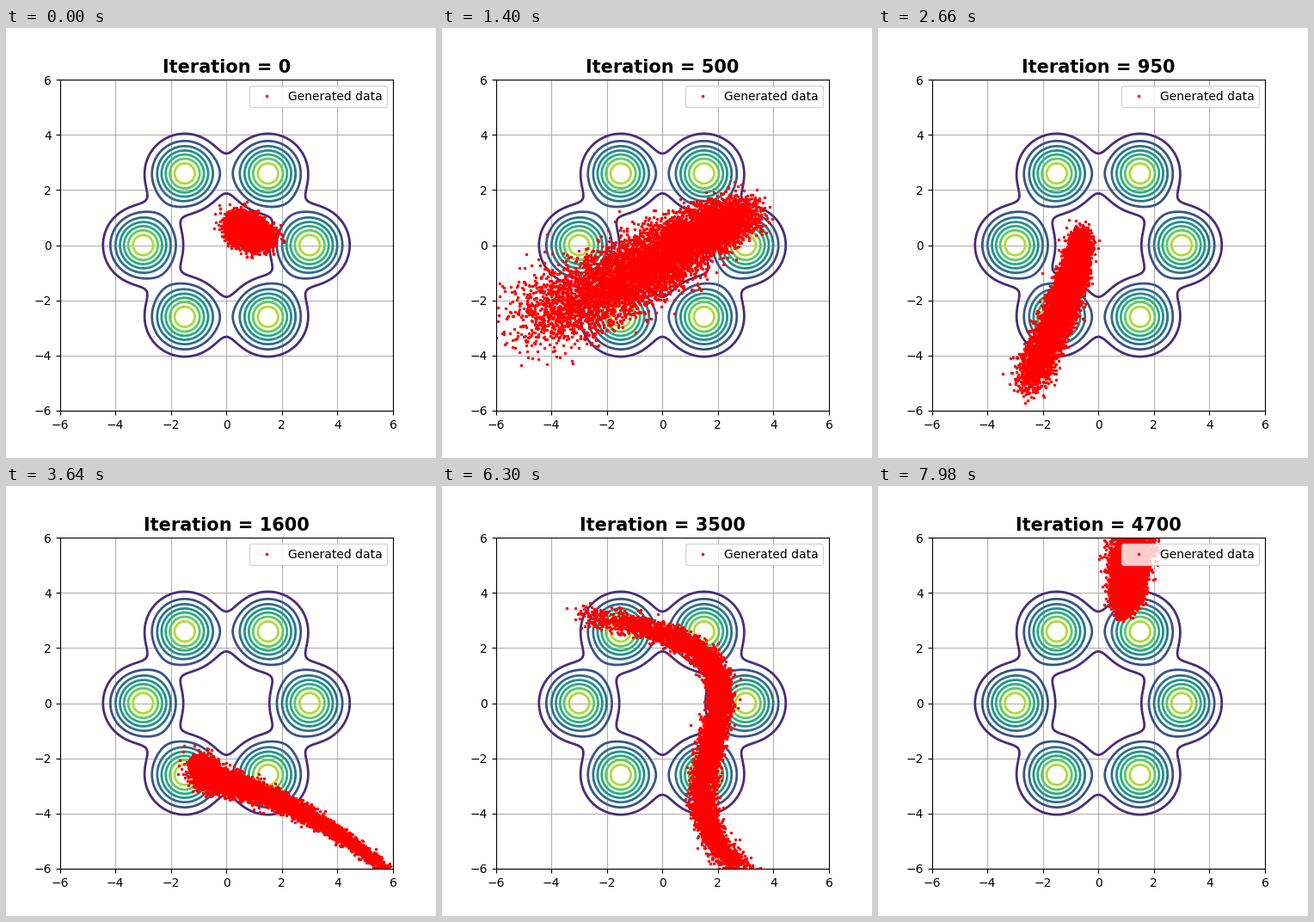
Recreate the animation shown at these times as a matplotlib script. Size 500 by 500 pixels, loop 8000 ms.

```python
import numpy as np
import matplotlib.pyplot as plt
from matplotlib.animation import FuncAnimation

TICK = 20        # ms per animation frame
HOLD = 7         # frames per training snapshot
FRAMES = 400
LIM = 6
N = 8000

# snapshot: (spread at head and tail, four points along the spine)
POSES = {
    0: ((.25, .24), [(.3, .8), (.6, .6), (.9, .4), (1.4, .25)]),
    10: ((.35, .75), [(3.3, 1.2), (1.1, .3), (-1.2, -1.1), (-5, -2.7)]),
    19: ((.2, .3), [(-.6, .5), (-.95, -1.1), (-1.55, -2.8), (-2.6, -5.1)]),
    26: ((.27, .1), [(-.9, -2.2), (-.2, -2.8), (2.2, -3.7), (5.8, -6.1)]),
    35: ((.4, .17), [(4.1, 1.4), (2.2, 1.35), (-1.2, .75), (-6.6, -.65)]),
    45: ((.22, .2), [(3.4, -6.4), (1.5, -2.6), (2, .9), (-3, 3.2)]),
    56: ((.22, .22), [(-2.2, -6.2), (-2.8, -3.5), (-1.9, -1.7), (-.3, .4)]),
    57: ((.18, .4), [(.9, 3.4), (1, 4.2), (1.15, 5.2), (1.35, 6.8)]),
}
STEPS = list(POSES)

rng = np.random.default_rng(4)
along = rng.beta(1.4, 1.4, N)
noise = rng.normal(size=(N, 2))


def cloud(step):
    """Noise scattered around a cubic spine, blended between two poses."""
    k = min(np.searchsorted(STEPS, step, side="right"), len(STEPS) - 1)
    a, b = STEPS[k - 1], STEPS[k]
    f = (step - a) / (b - a)
    (head, tail), spine = ((1 - f) * np.array(p) + f * np.array(q)
                           for p, q in zip(POSES[a], POSES[b]))
    cubic = np.polyfit(np.linspace(0, 1, 4), spine, 3)
    width = head + (tail - head) * along
    return np.vander(along, 4) @ cubic + noise * width[:, None]


def iteration(step):
    return 50 * step if step <= 20 else 1000 + 100 * (step - 20)


fig, ax = plt.subplots(figsize=(5, 5), dpi=100)
ax.set(xlim=(-LIM, LIM), ylim=(-LIM, LIM))
ax.grid(True)

# Six Gaussian modes on a circle of radius 3
axis = np.linspace(-LIM, LIM, 241)
X, Y = np.meshgrid(axis, axis)
density = sum(np.exp(-(X - 3 * np.cos(a)) ** 2 - (Y - 3 * np.sin(a)) ** 2)
              for a in np.arange(6) * np.pi / 3)
ax.contour(X, Y, density, levels=np.arange(1, 8) / 8, linewidths=2,
           cmap="viridis", vmin=0, vmax=1)

dots, = ax.plot([], [], "r.", markersize=3, label="Generated data")
ax.legend(loc="upper right")
title = ax.set_title("", fontsize=15, fontweight="bold")

clouds = [cloud(s) for s in range((FRAMES - 1) // HOLD + 1)]


def update(frame):
    step = frame // HOLD
    dots.set_data(*clouds[step].T)
    title.set_text(f"Iteration = {iteration(step)}")
    return dots, title


anim = FuncAnimation(fig, update, frames=FRAMES, interval=TICK,
                     repeat=True, repeat_delay=0)
plt.show()
```
